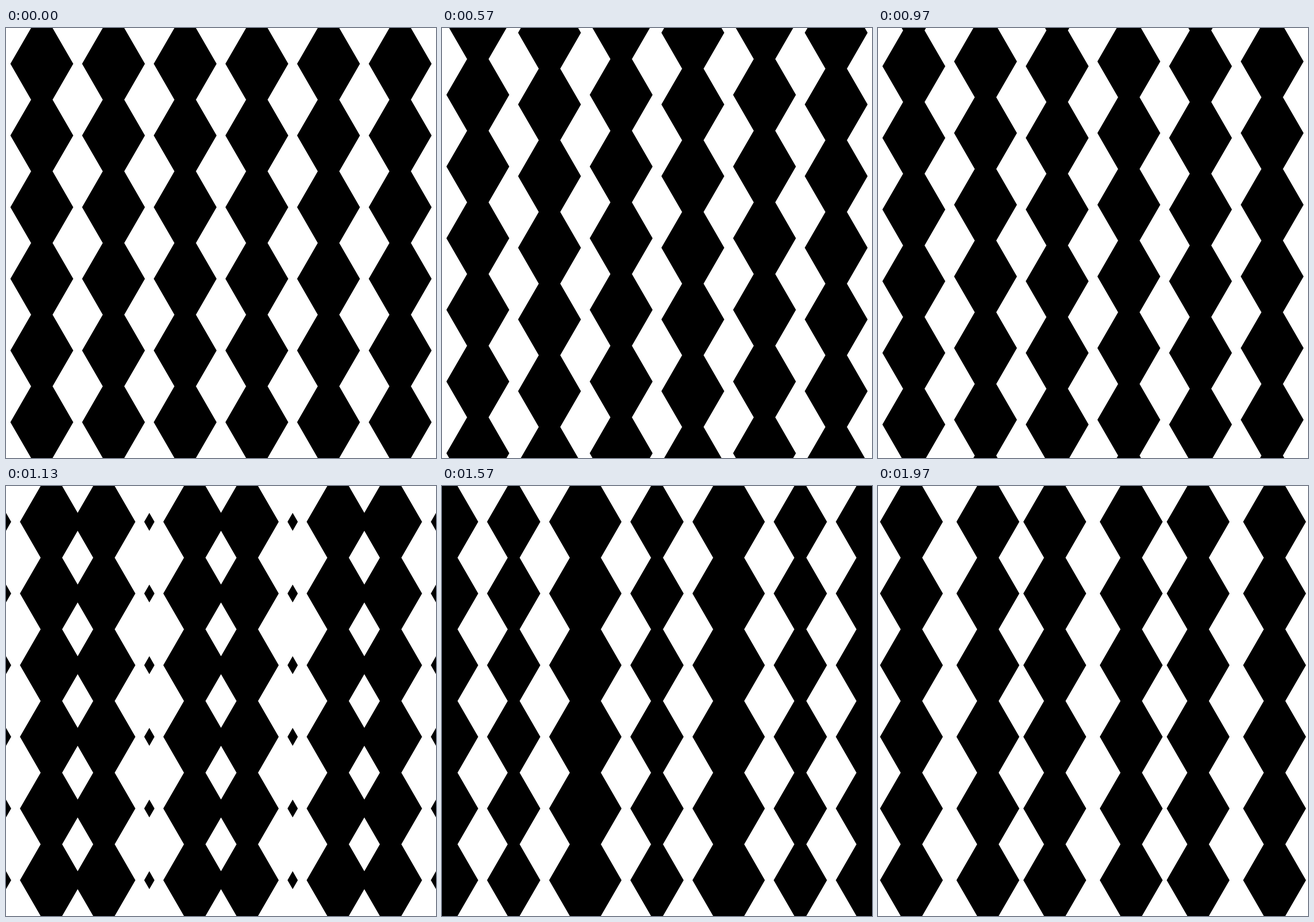
Recreate the animation shown at these times as an HTML page. Size 748 by 748 pixels, loop 2 s.

```html
<!DOCTYPE html>
<html lang="en">
<head>
<meta charset="utf-8">
<title>Sliding hexagon columns</title>
<style>
  html, body { margin: 0; width: 100%; height: 100%; overflow: hidden; background: #fff; }
  svg { display: block; width: 100%; height: 100%; }
</style>
</head>
<body>
<svg viewBox="0 0 748 748"><path id="columns" fill="#000"/></svg>
<script>
const LOOP = 2000;
const STEPS = 60;
const COUNT = 6;
const CELL = 748 / COUNT;
const HALF = CELL / 2;
const WAIST = CELL * 0.15;
const SLOPE = Math.sqrt(3);
const BULGE = WAIST + HALF / SLOPE;
const path = document.getElementById("columns");

// A vertical chain of hexagons; inset narrows it evenly on both sides.
function column(x, shift = 0, inset = 0) {
  const bulge = BULGE - inset;
  if (bulge <= 0) return "";
  const waist = Math.max(0, WAIST - inset);
  const height = (bulge - waist) * SLOPE;
  const edge = [];
  for (let row = -1; row <= COUNT; row++) {
    const y = HALF + row * CELL + shift;
    edge.push([waist, y - height], [bulge, y], [waist, y + height]);
  }
  const right = edge.map(([w, y]) => [x + w, y]);
  const left = edge.map(([w, y]) => [x - w, y]).reverse();
  return "M" + [...right, ...left].map(p => p.map(v => v.toFixed(3))).join("L") + "Z";
}

// Neighbouring columns slide in opposite vertical directions.
function slideVertical(shift) {
  let d = "";
  for (let i = 0; i < COUNT; i++) {
    d += column(HALF + i * CELL, i % 2 ? shift : -shift);
  }
  return d;
}

// Columns cross in pairs; pairs alternate between union and intersection.
function slideHorizontal(shift) {
  const gap = Math.abs(HALF - shift);
  const oddUnion = shift < HALF;
  let d = "";
  for (let i = 0; i <= COUNT; i++) {
    const x = i * CELL;
    const isUnion = (i % 2 === 1) === oddUnion;
    d += isUnion ? column(x - gap) + column(x + gap) : column(x, 0, gap);
  }
  return d;
}

// Sixty steps per loop, each starting on a multiple of 10 ms.
function stepAt(time) {
  return Math.floor((Math.floor((time % LOOP) / 10) * 3 + 1) / 10);
}

function draw(time) {
  const half = STEPS / 2;
  const step = stepAt(time);
  const shift = (step % half) / half * CELL;
  path.setAttribute("d", step < half ? slideVertical(shift) : slideHorizontal(shift));
}

function tick() {
  draw(performance.now());
  requestAnimationFrame(tick);
}
tick();
</script>
</body>
</html>
```
